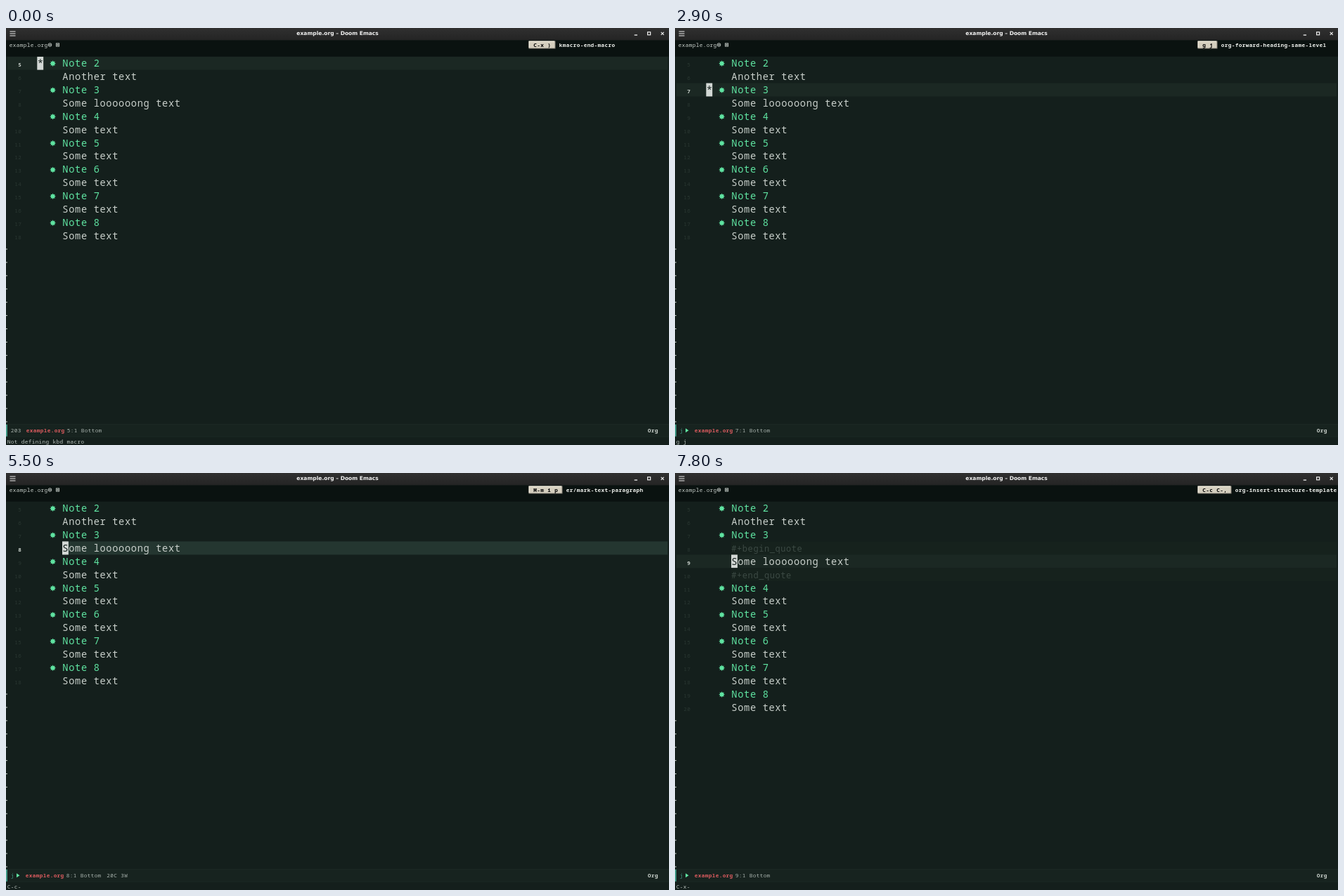
An HTML page with a canvas that plays this animation: 943x594 px, repeating every 8 s.

```html
<!DOCTYPE html>
<html lang="en">
<head>
<meta charset="utf-8">
<title>Doom Emacs macro</title>
<style>
html, body { margin: 0; width: 100%; height: 100%; overflow: hidden; background: #141f1c; }
canvas { display: block; width: 943px; height: 594px; }
</style>
</head>
<body>
<canvas id="stage" width="943" height="594"></canvas>
<script>
const ctx = document.getElementById('stage').getContext('2d');
const LOOP = 8000, W = 943, H = 594;
const ROW = 18.92, TOP = 40.7, CELL = 8.87, SMALL = 5, LEFT = 80;
const MONO = '"Noto Sans Mono", "DejaVu Sans Mono", monospace';
const C = {
  bg: '#141f1c', bar: '#0a1210', line: '#1b2823', region: '#243630', block: '#16221d',
  mode: '#17231f', edge: '#1c2a25', text: '#c9d0cb', head: '#5fe3a1', dim: '#2a3732',
  quote: '#3c4a44', red: '#d95b5e', teal: '#3f9683', pale: '#d3d8d5', prefix: '#8488b0'
};

const LONG = 'Some l' + 'o'.repeat(6) + 'ng text';
const NOTES = ['* Note 2', 'Another text', '* Note 3', LONG];
for (let n = 4; n <= 8; n++) NOTES.push('* Note ' + n, 'Some text');
const QUOTED = [...NOTES];
QUOTED.splice(3, 1, '#+begin_quote', LONG, '#+end_quote');

const MENU = [
  'Select a key', '============', '', '[v]...  src verb, verse...', '[j]     src json',
  '[y]     src yaml', '[g]     src go', '[t]     src typescript',
  '[s]...  src scheme, src sh, src sql, ......', '[p]     src python',
  '[e]...  src emacs-lisp, example...', '[n]     notes', '[a]     export ascii',
  '[c]     center', '[C]     comment', '[E]     export', '[h]     export html',
  '[l]     export latex', '[q]     quote', '[   ]     Press TAB, RET or SPC to write block name'
];

// Each step changes only what it names; the rest carries over.
const STEPS = [
  [0, { name: 'example.org', tab: 'example.org', key: 'C-x )', cmd: 'kmacro-end-macro', row: 0,
        lines: NOTES, modeY: 564, echo: 'Not defining kbd macro' }],
  [700, { echo: 'C-x-' }],
  [1200, { echo: 'Defining kbd macro...', key: 'C-x (', cmd: 'kmacro-start-macro' }],
  [1300, { macro: true }],
  [2900, { row: 2, key: 'g j', cmd: 'org-forward-heading-same-level', echo: 'g j' }],
  [3700, { row: 3, key: 'j', cmd: 'next-line', echo: '' }],
  [4400, { echo: 'M-m-' }],
  [4600, { echo: 'M-m i-', hints: true, modeY: 530.7 }],
  [4700, { echo: 'M-m i p', hints: false, modeY: 564, region: true,
           key: 'M-m i p', cmd: 'er/mark-text-paragraph' }],
  [5500, { echo: 'C-c-' }],
  [5700, { echo: 'Key:', menu: true, modeY: 330.7, name: '*Org Select*', tab: '*Org Select*' }],
  [6400, { echo: '', menu: false, modeY: 564, region: false, tab: 'example.org', row: 4,
           lines: QUOTED, key: 'C-c C-,', cmd: 'org-insert-structure-template' }],
  [6500, { name: 'example.org' }],
  [7800, { echo: 'C-x-' }]
];

const stateAt = t => Object.assign({}, ...STEPS.filter(s => s[0] <= t).map(s => s[1]));

function rect(x, y, w, h, color) {
  ctx.fillStyle = color;
  ctx.fillRect(x, y, w, h);
}

function stroke(color, width, ...paths) {
  ctx.strokeStyle = color;
  ctx.lineWidth = width;
  ctx.beginPath();
  for (const [x, y, x2, y2] of paths) { ctx.moveTo(x, y); ctx.lineTo(x2, y2); }
  ctx.stroke();
}

// Monospace text on a grid of the given cell width.
function mono(str, x, y, color, cell = SMALL, weight = 400) {
  const size = cell * 1.54, gap = cell - size * 0.6;
  ctx.font = `${weight} ${size}px ${MONO}`;
  ctx.letterSpacing = gap + 'px';
  ctx.textAlign = 'left';
  ctx.fillStyle = color;
  ctx.fillText(str, x + gap / 2, y);
}

function star(x, y) {
  ctx.fillStyle = C.head;
  ctx.beginPath();
  for (let i = 0; i < 16; i++) {
    const a = i * Math.PI / 8, r = i % 2 ? 2.7 : 4.3;
    ctx.lineTo(x + r * Math.cos(a), y + r * Math.sin(a));
  }
  ctx.fill();
}

function titleBar(name) {
  const g = ctx.createLinearGradient(0, 0, 0, 17.5);
  g.addColorStop(0, '#303030');
  g.addColorStop(1, '#242424');
  rect(0, 0, W, 17.5, g);
  ctx.font = 'bold 7.55px "DejaVu Sans", sans-serif';
  ctx.letterSpacing = '0px';
  ctx.textAlign = 'center';
  ctx.fillStyle = '#f2f2f2';
  ctx.fillText(name + ' – Doom Emacs', 471.6, 10.4);
  for (const y of [4.5, 7.5, 10.5]) rect(5.5, y, 8, 1, '#eee');
  rect(893.7, 9.4, 4.3, 1.3, '#eee');
  ctx.strokeStyle = '#eee';
  ctx.lineWidth = 1.2;
  ctx.strokeRect(912.6, 5.8, 4, 4);
  stroke('#eee', 1.2, [931.7, 5.8, 935.7, 9.8], [935.7, 5.8, 931.7, 9.8]);
}

function tabBar({ tab, key, cmd }) {
  rect(0, 17.5, W, 23.2, C.bar);
  mono(tab, 4.5, 26.5, C.text);
  const x = 4.5 + tab.length * SMALL + 3, y = 24;
  ctx.strokeStyle = C.text;
  ctx.lineWidth = 0.9;
  ctx.beginPath();
  ctx.arc(x, y, 2.3, 0, 7);
  ctx.stroke();
  stroke(C.text, 0.9, [x - 1.4, y - 1.4, x + 1.4, y + 1.4], [x + 1.4, y - 1.4, x - 1.4, y + 1.4]);
  ctx.strokeRect(x + 8.9, y - 2.1, 4.2, 4.2);
  stroke(C.text, 0.9, [x + 9.6, y, x + 12.4, y], [x + 11, y - 1.4, x + 11, y + 1.4]);

  const cells = Math.max(5, key.length + 2), w = cells * SMALL + 3, bx = 743.5;
  rect(bx, 18.5, w, 11, '#837f75');
  rect(bx, 18.5, w - 1.2, 9.8, '#f4eee0');
  rect(bx + 1.3, 19.8, w - 2.6, 8.4, '#d5cfbf');
  mono(key, bx + 1.5 + (cells - key.length) / 2 * SMALL, 26.5, '#000', SMALL, 700);
  mono(cmd, bx + w + 5, 26.5, '#f0f2ee', SMALL, 700);
}

function bufferLine(str, i, s) {
  const base = 55 + i * ROW, y = TOP + i * ROW, current = i === s.row;
  const heading = str[0] === '*', fence = str[0] === '#';
  if (fence) rect(LEFT, y, 941 - LEFT, ROW, C.block);
  if (current && s.region) rect(LEFT, y, 941 - LEFT, ROW, C.region);
  else if (current) rect(2, y, 939, ROW, C.line);

  const num = String(i + 5);
  mono(num, 22 - num.length * SMALL, base, current ? C.text : C.dim, SMALL, current ? 700 : 400);
  if (heading) star(66.6, base - 4.4);
  const label = heading ? str.slice(2) : str;
  mono(label, LEFT, base, heading ? C.head : fence ? C.quote : C.text, fence ? 7.78 : CELL);

  if (current && !s.menu) {
    const x = heading ? 44.3 : LEFT;
    rect(x, y, CELL, ROW, C.pale);
    mono(str[0], x, base, C.bg, CELL);
  }
}

function modeLine(s) {
  const y = s.modeY, base = y + 11.8, off = s.menu;
  rect(0, y, W, 18.4, off ? C.bg : C.mode);
  rect(0, y, W, 0.8, C.edge);
  rect(0, y + 17.8, W, 0.8, C.edge);
  const color = off ? '#35443d' : '#a9b3ae';
  const recording = s.macro && !off, x = recording ? 28 : 29;
  if (!off) rect(0, y + 0.8, 2, 17, C.teal);
  if (recording) {
    mono('j', 6.5, base, C.teal);
    ctx.fillStyle = C.head;
    ctx.beginPath();
    ctx.moveTo(15, y + 6.2);
    ctx.lineTo(19.5, y + 9.2);
    ctx.lineTo(15, y + 12.2);
    ctx.fill();
  } else mono('203', 6.5, base, color);
  mono(s.name === '*Org Select*' || s.tab ? 'example.org' : s.name, x - 0.5, base, C.red, SMALL, 700);
  mono(`${s.row + 5}:1 Bottom`, x + 57.5, base, color);
  if (s.region) mono('20C 3W', x + 115, base, color);
  mono('Org', 912.5, base, off ? color : C.text, SMALL, 700);
}

function hints() {
  ['a', 'i'].forEach((key, i) => {
    const y = 558.3 + i * 13;
    mono(key, 6.5, y, C.head);
    stroke('#4b5a54', 0.8, [17.3, y - 2.4, 21.3, y - 2.4], [19.8, y - 3.9, 21.4, y - 2.4],
      [19.8, y - 0.9, 21.4, y - 2.4]);
    mono('+prefix', 26.5, y, C.prefix);
  });
  rect(0, 582.6, W, 0.8, C.edge);
}

function menu() {
  MENU.forEach((str, i) => mono(str, 4.5, 358.3 + i * 11.11, '#bcc5c0'));
  rect(4.5, 350, SMALL, 11, C.pale);
  mono('S', 4.5, 358.3, C.bg);
  rect(0, 582.6, W, 0.8, C.edge);
}

function draw(t) {
  const s = stateAt(t);
  rect(0, 0, W, H, C.bg);
  s.lines.forEach((str, i) => bufferLine(str, i, s));
  for (let i = s.lines.length; 50 + i * ROW < s.modeY; i++) rect(0, 49.6 + i * ROW, 2, 1, C.text);
  modeLine(s);
  if (s.hints) hints();
  if (s.menu) menu();
  mono(s.echo, 1.5, 591.7, '#b9c2bd');
  titleBar(s.name);
  tabBar(s);
}

const start = performance.now();
function tick() {
  draw((performance.now() - start) % LOOP);
  requestAnimationFrame(tick);
}
tick();
</script>
</body>
</html>
```
